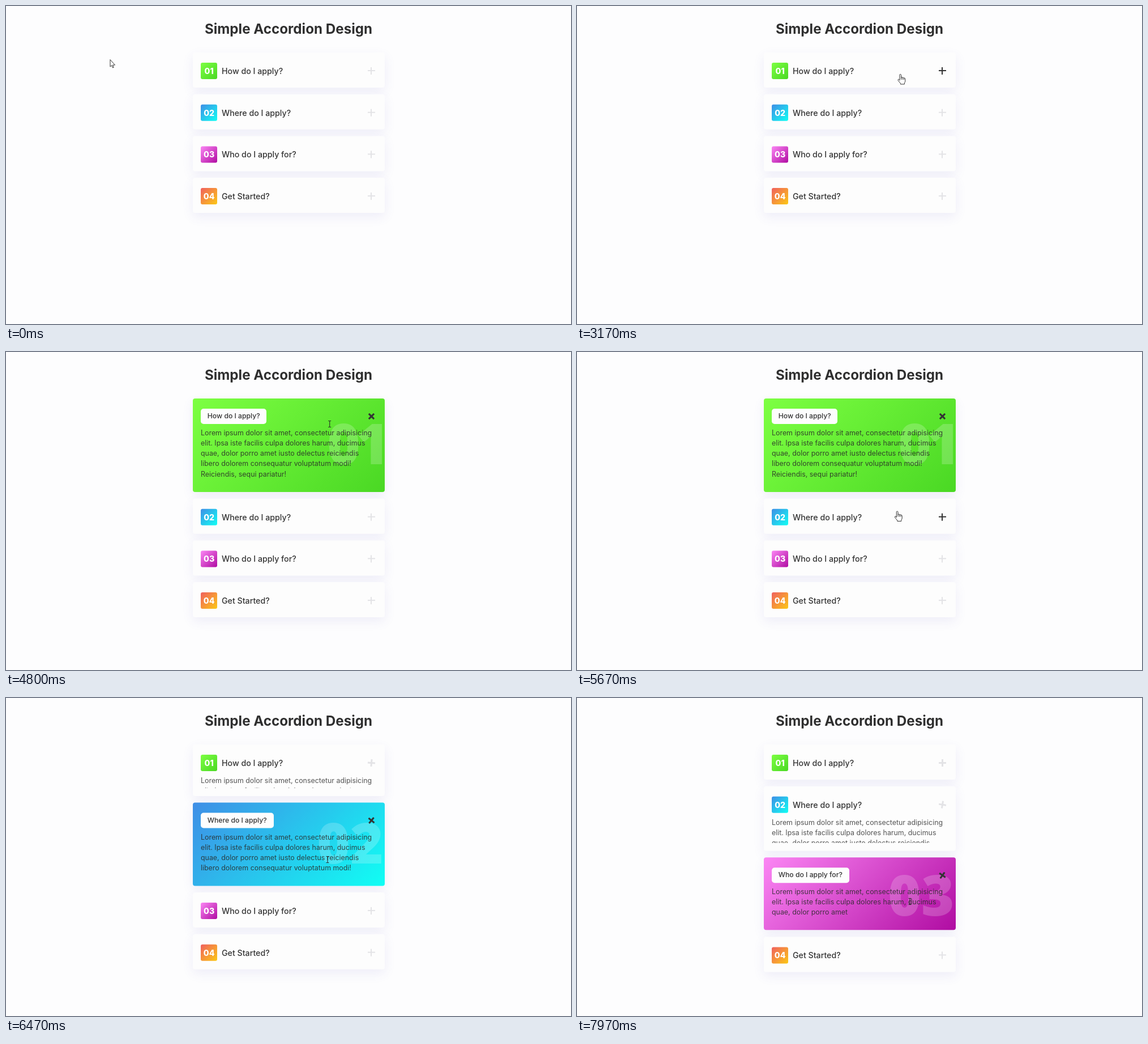
An HTML page for the animation above (8000 ms loop, 998 px wide and 561 px high).

```html
<!DOCTYPE html>
<html lang="en">
<head>
<meta charset="utf-8">
<title>Simple Accordion Design</title>
<style>
  html, body { margin: 0; width: 100%; height: 100%; overflow: hidden; background: #fdfdfe; }
  #stage { position: relative; width: 998px; height: 561px; overflow: hidden; font-family: Inter, sans-serif; color: #333; }
  #stage * { position: absolute; white-space: nowrap; box-sizing: border-box; }
  h1 { left: 0; width: 998px; top: 21px; margin: 0; text-align: center; font: 700 24.2px/40px Inter, sans-serif; color: #2f2f2f; }
  .card { left: 329.5px; top: 0; width: 339px; border-radius: 4px; overflow: hidden; background: #fdfdfd; box-shadow: 0 7px 20px rgba(80, 70, 190, .085); }
  .card.active { background: var(--fill); }
  .badge { left: 14.5px; top: 18px; width: 29.3px; height: 29.3px; border-radius: 3px; background: var(--fill); color: #fff; font: 800 14.2px/29.3px Inter, sans-serif; text-align: center; }
  .label { left: 51.5px; top: 18px; font-weight: 500; font-size: 14.2px; line-height: 30px; }
  .active .badge { display: none; }
  .active .label { left: 14.5px; height: 26.5px; padding: 0 11.8px; border-radius: 5px; background: #fdfdfd; font-size: 12.2px; line-height: 26.5px; }
  .icon { left: 309.4px; top: 25.6px; width: 13px; height: 13px; color: #e3e3e6; }
  .icon::before, .icon::after { content: ""; position: absolute; background: currentColor; }
  .icon::before { left: 0; top: 5.4px; width: 13px; height: 2.2px; }
  .icon::after { left: 5.4px; top: 0; width: 2.2px; height: 13px; }
  .active .icon { top: 24.6px; }
  .active .icon, .hover .icon { color: #333; }
  .number { display: none; right: 2px; font: 800 100px/72px "Open Sans", sans-serif; color: rgba(255, 255, 255, .2); }
  .number.narrow { right: 0; letter-spacing: -8px; }
  .active .number { display: block; }
  .body { left: 14.5px; top: 48px; width: 320px; overflow: hidden; }
  .active .body { top: 45px; }
  .body p { margin: 0; left: 0; top: 6.6px; font-size: 12.4px; line-height: 18.3px; color: #555; }
  .active .body p { color: rgba(40, 40, 40, .84); }
  #cursor { left: 0; top: 0; width: 1px; height: 1px; overflow: visible; }
  #cursor path { fill: #fff; stroke: #333; stroke-width: 1; stroke-linejoin: round; stroke-linecap: round; }
</style>
</head>
<body>
<div id="stage">
  <h1>Simple Accordion Design</h1>
  <svg id="cursor">
    <path data-kind="arrow" d="M.5 0V12.2L3.2 9.7L5 14L6.8 13.2L5 9.1H8.6Z"/>
    <path data-kind="hand" d="M-1.7 10.5V1.2Q-1.6 0 -.4 0T1 1.2V6Q1.3 5 2.4 5.1T3.5 6.3Q4 5.4 5 5.7T6 7Q6.6 6.3 7.4 6.7T8.2 8V12Q8 14 6.8 15.4V17.5H-.2V16L-4.2 11.2Q-5 9.6 -4 8.9Q-3.2 8.4 -2.4 9.4ZM1 6V9M3.5 6.3V9.2M6 7V9.4"/>
    <path data-kind="beam" d="M-2 -5.5H-.6L0 -5L.6 -5.5H2M0 -5V5M-2 5.5H-.6L0 5L.6 5.5H2" style="fill:none;stroke:#222"/>
  </svg>
</div>
<script>
const LOOP = 8000, FIRST_TOP = 82, GAP = 11.7, CLIP_HEIGHT = 740, FADE = 600, LINE = 18.3;
const LOREM = [
  "Lorem ipsum dolor sit amet, consectetur adipisicing",
  "elit. Ipsa iste facilis culpa dolores harum, ducimus",
  "quae, dolor porro amet iusto delectus reiciendis",
  "libero dolorem consequatur voluptatum modi!",
  "Reiciendis, sequi pariatur!"
];
const cards = [
  { label: "How do I apply?", fill: "#7dff42, #4ad824", lines: LOREM, open: 3930, close: 6020 },
  { label: "Where do I apply?", fill: "#3f8ee6, #10fff4", lines: LOREM.slice(0, 4), open: 6020, close: 7565 },
  { label: "Who do I apply for?", fill: "#fb86f4, #b00ca2", lines: [...LOREM.slice(0, 2), "quae, dolor porro amet"], open: 7565, close: Infinity },
  { label: "Get Started?", fill: "#f0605f, #fcc914", lines: [], open: Infinity, close: Infinity }
];
// time, x, y of the pointer's hot spot
const track = [
  [30, 183.5, 95], [500, 188, 98], [800, 188, 98], [1560, 818, 319], [1630, 822, 320],
  [1730, 842, 322], [1870, 842, 322], [1970, 876, 322], [2300, 876, 322], [3100, 571, 121],
  [3230, 572, 120], [4700, 572, 120], [5500, 566, 280], [5670, 566, 281], [6040, 566, 281],
  [6470, 568, 285], [6900, 568, 285], [7430, 572, 352], [7670, 573, 352], [7970, 588, 359]
];

const stage = document.getElementById("stage");
const cursor = document.getElementById("cursor");
const pointers = [...cursor.children];

function add(parent, className, text = "", tag = "div") {
  const node = document.createElement(tag);
  node.className = className;
  node.textContent = text;
  return parent.appendChild(node);
}

cards.forEach((card, i) => {
  const name = "0" + (i + 1);
  const el = card.el = add(stage, "card");
  el.style.setProperty("--fill", `linear-gradient(135deg, ${card.fill})`);
  card.number = add(el, i ? "number" : "number narrow", name);
  add(el, "badge", name);
  add(el, "label", card.label);
  card.icon = add(el, "icon");
  card.body = add(el, "body");
  const text = add(card.body, "", "", "p");
  text.style.whiteSpace = "pre";
  text.textContent = card.lines.join("\n");
  card.full = card.lines.length ? 14.5 + LINE * card.lines.length : 0;
});
stage.append(cursor);

// The standard CSS "ease" curve, solved by bisection.
function ease(x) {
  if (x <= 0) return 0;
  if (x >= 1) return 1;
  let low = 0, high = 1, s = .5;
  for (let i = 0; i < 20; i++) {
    s = (low + high) / 2;
    if (.75 * s * (1 - s) + s ** 3 < x) low = s; else high = s;
  }
  return .3 * s * (1 - s) ** 2 + 3 * s * s * (1 - s) + s ** 3;
}

function pointerAt(t) {
  const next = track.findIndex(step => step[0] > t);
  if (next === 0) return track[0].slice(1);
  if (next < 0) return track.at(-1).slice(1);
  const [t0, x0, y0] = track[next - 1], [t1, x1, y1] = track[next];
  const k = (t - t0) / (t1 - t0), p = k * k * (3 - 2 * k);
  return [x0 + (x1 - x0) * p, y0 + (y1 - y0) * p];
}

function render(t) {
  const [x, y] = pointerAt(t);
  let top = FIRST_TOP, kind = "arrow";
  for (const card of cards) {
    const active = t >= card.open && t < card.close;
    const progress = t >= card.close ? 1 - ease((t - card.close) / FADE) : ease((t - card.open) / FADE);
    const content = Math.min(card.full, CLIP_HEIGHT * progress);
    const height = (active ? 59 : 62) + content;
    const hover = x > 329.5 && x < 668.5 && y > top && y < top + height;
    if (hover) kind = content > 0 && y > top + 45 ? "beam" : "hand";
    card.el.classList.toggle("active", active);
    card.el.classList.toggle("hover", hover);
    card.el.style.height = height + "px";
    card.el.style.transform = `translateY(${top}px)`;
    card.body.style.height = content + "px";
    card.icon.style.transform = `rotate(${135 * progress}deg)`;
    card.number.style.top = Math.max(30.5, height / 2 - 38.5) - 3 + "px";
    top += height + GAP;
  }
  cursor.style.transform = `translate(${x}px, ${y}px)`;
  for (const p of pointers) p.style.display = p.dataset.kind === kind ? "" : "none";
}

const start = performance.now();
function tick() {
  render((performance.now() - start) % LOOP);
  requestAnimationFrame(tick);
}
tick();
</script>
</body>
</html>
```
